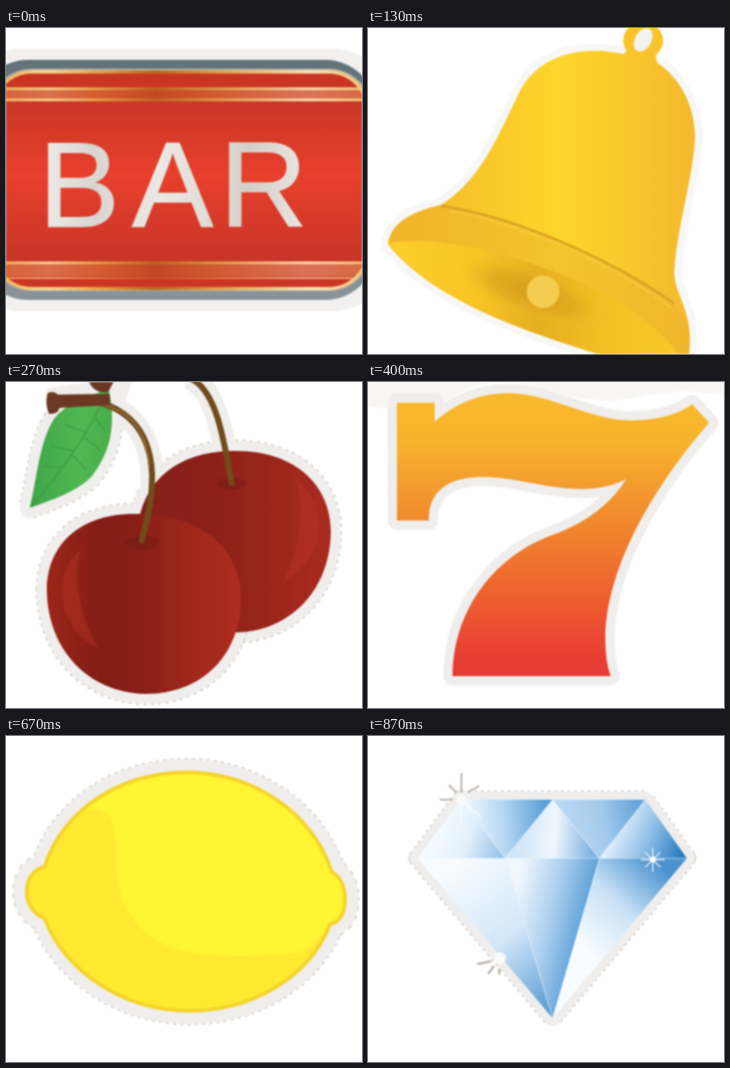
Recreate the animation shown at these times as an HTML page. Size 480 px wide and 440 px high, loop 940 ms.

```html
<!DOCTYPE html>
<html lang="en">
<head>
<meta charset="utf-8">
<title>Slot reel</title>
<style>
html, body { margin: 0; width: 100%; height: 100%; overflow: hidden; background: #fff; }
svg { display: block; width: 100vw; height: 100vh; }
.sym { visibility: hidden; filter: blur(.9px); }
.halo { fill: #efeeec; stroke: #efeeec; stroke-linejoin: round; }
.edge { fill: none; stroke: #d3c8c0; stroke-linejoin: round; stroke-dasharray: 4 5; }
</style>
</head>
<body>
<svg id="stage" viewBox="0 0 480 440"></svg>
<script>
const slope = (id, [x1, y1, x2, y2], ...stops) => {
  const list = stops.map(([at, color]) => `<stop offset="${at}" stop-color="${color}"/>`).join('');
  return `<linearGradient id="${id}" gradientUnits="userSpaceOnUse" x1="${x1}" y1="${y1}" x2="${x2}" y2="${y2}">${list}</linearGradient>`;
};
const grad = (id, axis, from, to, ...stops) =>
  slope(id, axis === 'x' ? [from, 0, to, 0] : [0, from, 0, to], ...stops);
const path = (d, fill, more = '') => `<path d="${d}" fill="${fill}" ${more}/>`;
const line = (d, color, width, more = '') =>
  `<path d="${d}" fill="none" stroke="${color}" stroke-width="${width}" ${more}/>`;
// Sticker border with a faint ragged rim
const halo = (d, width, rim = true) =>
  (rim ? `<path class="edge" d="${d}" stroke-width="${width + 3}"/>` : '') +
  `<path class="halo" d="${d}" stroke-width="${width}"/>`;
const frame = (x, y, right, r, fill) =>
  `<rect x="${x}" y="${y}" width="${right - x}" height="${410 - 2 * y}" rx="${r}" fill="${fill}"/>`;

function bar() {
  const strip = (y, h, alpha) =>
    `<rect x="-20" y="${y}" width="520" height="${h}" fill="url(#gold)" opacity="${alpha}"/>`;
  return grad('red', 'y', 57, 354, [0, '#c93522'], [.16, '#cc3727'], [.48, '#e8402c'], [.85, '#c93527'], [1, '#cc3524']) +
    grad('gold', 'x', 0, 480, [0, '#f0b860'], [.12, '#f7d694'], [.25, '#e9a64a'], [.42, '#b9681f'], [.6, '#e0a04a'], [.85, '#fae3b4'], [1, '#f3c77c']) +
    grad('silver', 'x', 50, 400, [0, '#eceae7'], [.2, '#d9d6d0'], [.45, '#ebe9e5'], [.8, '#d5cfc7'], [1, '#e8e5e0']) +
    grad('steel', 'y', 43, 367, [0, '#62727a'], [1, '#88949a']) +
    '<clipPath id="barClip"><rect x="-20" y="57" width="510" height="297" rx="55"/></clipPath>' +
    frame(-60, 28, 520, 80, '#f1f0ee') + frame(-40, 43, 500, 70, 'url(#steel)') +
    frame(-24, 55, 494, 59, '#b9b8ac') +
    '<g clip-path="url(#barClip)"><rect width="480" height="440" fill="url(#red)"/>' +
    strip(80, 19, .35) + strip(80, 4, .85) + strip(95, 4, .85) +
    strip(315, 20, .35) + strip(315, 4, .85) + strip(336, 3, .6) +
    '<rect x="-18" y="59" width="506" height="293" rx="53" fill="none" stroke="url(#gold)" stroke-width="5"/></g>' +
    '<text x="44 170 288" y="268" font-size="164" font-family="Liberation Sans, Arial, sans-serif" fill="url(#silver)" stroke="url(#silver)" stroke-width="1.5">BAR</text>';
}

function bell() {
  const body = 'M27 292C30 262 62 247 98 239C150 207 174 149 200 95C219 51 258 28 318 31L345 35L388 46C420 65 441 105 441 148C438 205 417 265 413 330C414 364 440 382 433 440H310C210 409 86 367 27 292Z';
  const ring = '<ellipse cx="371" cy="17" rx="27" ry="25"/><path d="M344 38L352 24H386L390 48Z"/>';
  const mouth = 'M27 291C70 281 150 292 235 323C310 349 382 391 419 440H310C210 409 86 367 27 291Z';
  return grad('brass', 'x', 27, 441, [0, '#f0b52c'], [.35, '#fbc92a'], [.55, '#fdd52b'], [.78, '#fac82c'], [1, '#f3b82f']) +
    grad('lip', 'x', 27, 430, [0, '#fcd02c'], [.3, '#f8c424'], [.5, '#e6ae20'], [.72, '#f4bf22'], [1, '#fac92b']) +
    '<radialGradient id="hollow"><stop offset="0" stop-color="#d79e1c"/><stop offset=".6" stop-color="#dfa81f" stop-opacity=".7"/><stop offset="1" stop-color="#f3c024" stop-opacity="0"/></radialGradient>' +
    `<path class="halo" d="${body}" style="fill:#f7f7f6;stroke:#f7f7f6" stroke-width="20"/>` +
    `<g fill="#f9c42b">${ring}</g>` + path(body, 'url(#brass)') +
    path('M27 292C30 262 62 247 98 239C190 252 320 304 413 372C422 390 437 395 433 440H419C382 391 310 349 235 323C150 292 70 281 27 292Z', '#efb42a', 'opacity=".55"') +
    path(mouth, 'url(#lip)') +
    '<ellipse cx="222" cy="357" rx="105" ry="34" transform="rotate(20 222 357)" fill="url(#hollow)"/>' +
    line('M98 240C190 253 320 306 413 372', '#d9a022', 3) +
    line('M110 247C195 261 315 309 410 378', '#fbd140', 2, 'opacity=".7"') +
    '<circle cx="236" cy="356" r="22" fill="#f5cd50"/>' +
    '<ellipse cx="371" cy="16" rx="11" ry="17" transform="rotate(28 371 16)" fill="#f3f2ee"/>';
}

function cherry() {
  const back = 'M180 182C194 122 243 94 305 93C388 91 438 138 438 202C437 282 382 337 310 338Z';
  const front = 'M55 280C56 215 105 177 175 178C255 177 316 219 317 292C316 370 264 421 188 421C110 419 56 361 55 280Z';
  const leaf = 'M138 8C149 55 142 94 115 128C94 149 62 159 32 170C42 130 45 78 66 48C85 25 114 21 138 8Z';
  const stem = 'M72 27C137 16 194 46 197 125C197 170 188 192 183 214';
  const stem2 = 'M246 -6C284 8 294 80 304 136';
  const soft = [stem, stem2].map(d => line(d, '#efeeec', 31)).join('');
  return grad('dark', 'x', 55, 317, [0, '#9d261b'], [.28, '#821d14'], [.5, '#8b2017'], [.75, '#9f281b'], [1, '#b02d20']) +
    grad('rear', 'x', 180, 438, [0, '#84201a'], [.4, '#8d2118'], [.7, '#9b261b'], [1, '#a92b20']) +
    grad('green', 'x', 32, 145, [0, '#3fa648'], [.6, '#50b750'], [1, '#48ad4a']) +
    halo(back, 27) + halo(front, 27) + halo(leaf, 27) + soft +
    line('M58 30L140 18L150 -10', '#efeeec', 44, 'stroke-linejoin="round"') +
    path(back, 'url(#rear)') +
    path('M392 132C438 172 431 236 374 270C394 232 404 178 392 132Z', '#b53026', 'opacity=".65"') +
    path(leaf, 'url(#green)') +
    line('M138 10C114 65 80 115 34 168M121 49L133 65M106 75L128 93M90 99L108 119M109 68L79 57M93 93L59 86M77 116L50 113', '#3b973f', 2, 'opacity=".7"') +
    path(front, 'url(#dark)') +
    path('M101 226C65 252 62 325 124 360C101 315 88 268 101 226Z', '#ad3024', 'opacity=".55"') +
    '<ellipse cx="184" cy="217" rx="23" ry="10" fill="#741a13" opacity=".55"/>' +
    '<ellipse cx="304" cy="137" rx="19" ry="8" fill="#7b1b14" opacity=".6"/>' +
    line(stem, '#714b1c', 8, 'stroke-linecap="round"') + line(stem2, '#714b1c', 8, 'stroke-linecap="round"') +
    line('M92 27C151 24 190 52 193 116', '#947039', 2) +
    path('M56 15Q64 11 70 17L140 16V31L72 35Q70 44 58 43Q52 29 56 15ZM112 0H145L138 13Q120 17 112 0Z', '#6c3723');
}

function seven() {
  const d = 'M39 28H90V54C113 32 147 15 190 15C248 16 300 52 355 52C390 51 416 45 437 30L460 55C392 133 320 246 320 348Q320 376 327 397H114C115 302 176 232 250 206C294 190 328 164 348 131C300 156 245 140 196 132C132 121 81 132 82 187H39Z';
  return grad('fire', 'y', 15, 397, [0, '#f9ba2d'], [.18, '#f7b22e'], [.45, '#f18a2e'], [.72, '#ee602f'], [.92, '#e83f33'], [1, '#e73c34']) +
    path('M0 0H480V18Q420 7 365 20T240 10T120 17T0 32Z', '#f7f6f3') +
    halo(d, 25, false) + path(d, 'url(#fire)');
}

function pound() {
  const d = 'M64 187H132C132 78 155 17 262 16C350 16 405 68 405 125C405 158 385 178 353 178C322 178 304 155 304 130C304 108 316 94 333 88C324 77 301 70 278 70C235 70 222 100 222 150V187H294V234H222C222 263 219 280 208 302C226 288 250 286 275 296C300 306 314 312 332 309C353 304 362 284 362 238H425C426 330 393 398 320 398C260 398 230 373 180 373C150 373 127 388 113 411L73 336C111 312 137 282 134 234H64Z';
  return grad('amber', 'y', 16, 411, [0, '#f8c92c'], [.2, '#f6b92d'], [.5, '#f3962d'], [.72, '#ef702e'], [.92, '#e94f2e'], [1, '#e8452f']) +
    halo(d, 27) + path(d, 'url(#amber)');
}

function lemon() {
  const d = 'M52 176C78 98 155 49 245 49C335 50 414 105 439 183C453 192 458 206 457 224C456 241 449 251 437 254C409 325 333 371 246 371C157 370 80 318 52 246C37 240 28 227 28 210C28 192 37 181 52 176Z';
  return `<clipPath id="peel"><path d="${d}"/></clipPath>` + halo(d, 36) + path(d, '#ffea31') +
    '<g clip-path="url(#peel)">' +
    path('M108 100C170 85 134 190 164 235C194 292 260 306 398 292L480 220V0H130Z', '#fff532') + '</g>' +
    line(d, '#f5d42c', 5);
}

function diamond() {
  const outline = 'M125 86H374L430 165L249 381L67 165Z';
  const white = '#f8fcff', pale = '#d9eafa', mid = '#94c1e8', deep = '#4a92cf';
  const facets = [
    ['M125 86L67 165H185Z', [85, 130, 180, 165], white, '#e2f0fb', mid],
    ['M125 86H249L185 165Z', [125, 95, 238, 86], white, '#b5d6f1', '#5b9fd7'],
    ['M249 86L185 165H312Z', [200, 150, 300, 160], '#d0e5f7', '#f0f7fd', '#7fb3e1'],
    ['M249 86H374L312 165Z', [262, 110, 362, 90], '#b9d8f2', '#a5cced', '#65a5da'],
    ['M374 86L312 165H430Z', [330, 125, 420, 165], '#e8f3fc', '#8fbfe7', '#2b7dc1'],
    ['M67 165H185L249 381Z', [95, 190, 249, 381], white, '#d3e7f8', '#4b94d1'],
    ['M185 165H312L249 381Z', [195, 225, 300, 250], '#f0f7fd', '#accfee', '#5199d4'],
    ['M312 165H430L249 381Z', [295, 290, 400, 180], white, '#c9e1f5', '#4a93d0']
  ];
  const cut = facets.map(([d, ends, a, b, c], i) =>
    slope('facet' + i, ends, [0, a], [.5, b], [1, c]) + path(d, `url(#facet${i})`)).join('');
  return halo(outline, 22) + cut +
    line('M67 165H430M125 86L185 165L249 86L312 165L374 86M185 165L249 381L312 165', '#e6f2fc', 1.5, 'opacity=".45"') +
    line('M126 50V76M109 66L119 76M150 67L135 76M97 86H114', '#b9b3aa', 2.5) +
    line('M126 86L153 110M126 86V120', '#fff', 2, 'opacity=".7"') +
    line('M166 304L147 308M170 310L162 321M177 314V322', '#bbb5ac', 3) +
    '<circle cx="126" cy="86" r="7" fill="#fafaf8"/><circle cx="178" cy="300" r="8" fill="#f8faf9"/>' +
    line('M384 151V183M368 167H400M374 157L394 177M394 157L374 177', '#f4faff', 1.5) +
    '<circle cx="384" cy="167" r="4" fill="#fff"/>';
}

const symbols = { bar, bell, cherry, seven, pound, lemon, diamond };
const loop = 940;
const stops = [0, 130, 270, 400, 530, 670, 800];
const stage = document.getElementById('stage');
stage.innerHTML = '<rect width="480" height="440" fill="#fff"/>' +
  Object.entries(symbols).map(([id, draw]) => `<g class="sym" id="${id}">${draw()}</g>`).join('');
const groups = [...stage.querySelectorAll('.sym')];

function show(t) {
  const now = stops.filter(at => at <= t).length - 1;
  groups.forEach((g, i) => { g.style.visibility = i === now ? 'visible' : 'hidden'; });
}

const start = performance.now();
function tick() {
  show((performance.now() - start) % loop);
  requestAnimationFrame(tick);
}
show(0);
requestAnimationFrame(tick);
</script>
</body>
</html>
```
